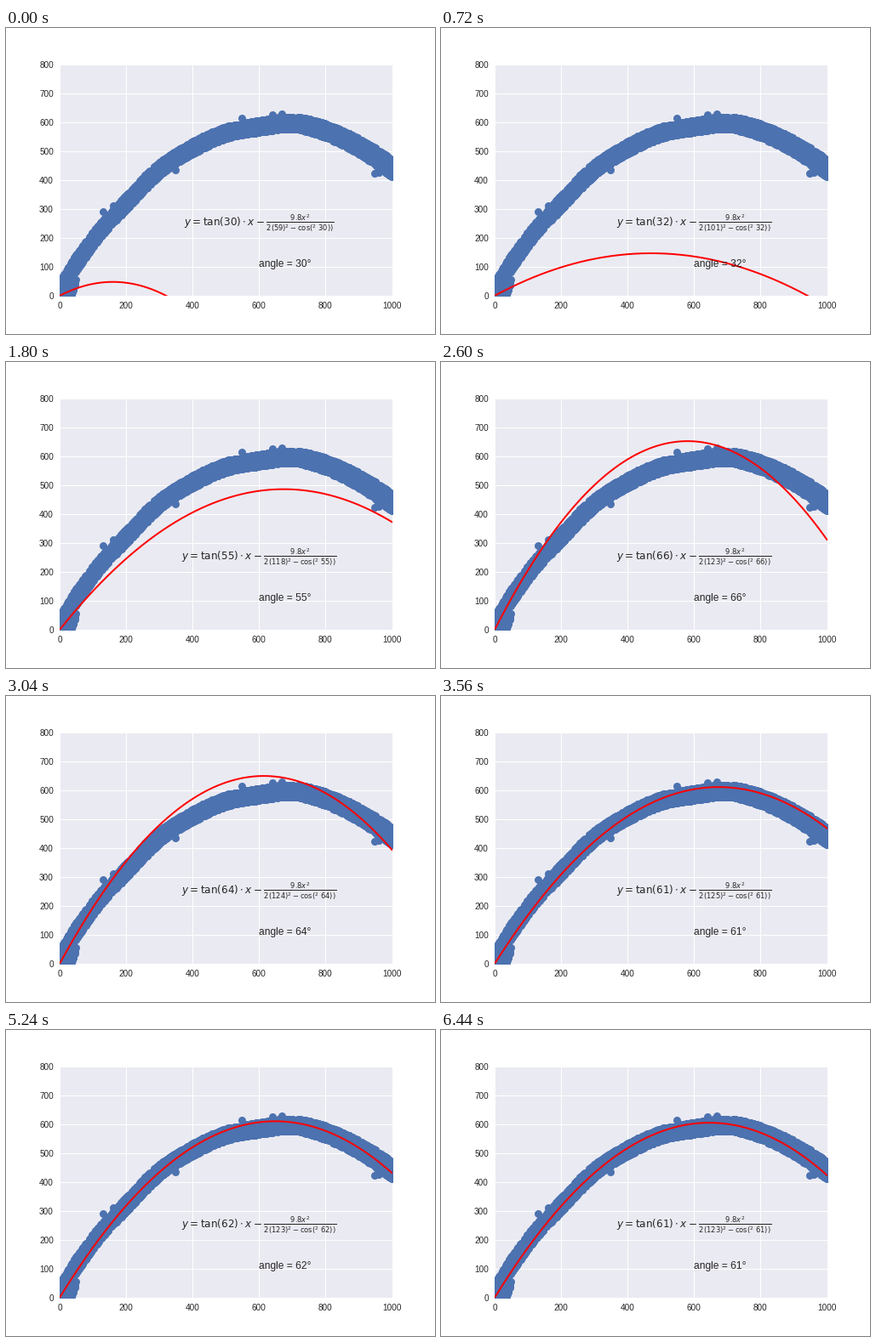
Animation of 504x360 px, one loop 6.52 s. Source, as a matplotlib script:

```python
import numpy as np
import matplotlib.pyplot as plt
from matplotlib.animation import FuncAnimation

INK = "0.15"
FRAMES, INTERVAL = 163, 40
G = 9.8

plt.rcParams.update({
    "font.family": "Liberation Sans",
    "mathtext.fontset": "dejavusans",
    "text.color": INK,
})

# Key points of the fit: step, angle in degrees, speed
FIT = np.array([
    (0, 30.9, 59.7), (13, 31.8, 99.5), (24, 35.9, 110.7),
    (36, 55.3, 118.8), (52, 66.05, 123.8), (71, 61.15, 125.03),
    (82, 60.4, 124.7), (105, 62.05, 123.9), (129, 61.95, 123.5),
])

# Key points on the middle of the scatter band
PATH = np.array([
    (0, 20), (100, 194), (200, 322), (300, 438), (400, 512),
    (500, 564), (600, 586), (700, 598), (850, 547), (1000, 440),
])
STRAYS = [(130, 291), (161, 312), (348, 437), (549, 615),
          (641, 627), (667, 630), (947, 423), (960, 427)]


def smooth(x, y, t):
    """Cubic Hermite interpolation through the points (x, y)."""
    slope = np.gradient(y, x, edge_order=2)
    i = np.clip(np.searchsorted(x, t, side="right") - 1, 0, len(x) - 2)
    h = x[i + 1] - x[i]
    u = (t - x[i]) / h
    return (y[i] * (1 + 2 * u) * (1 - u) ** 2
            + y[i + 1] * u * u * (3 - 2 * u)
            + h * u * (1 - u) * (slope[i] * (1 - u) - slope[i + 1] * u))


def scatter_data():
    rng = np.random.default_rng(7)
    x = np.linspace(0, 1000, 3000)
    mid = smooth(*PATH.T, x)
    # Brush half-width grows to the right; keep it even across the slope
    half = (15 + 0.009 * x) * np.hypot(1, 0.87 * np.gradient(mid, x))
    y = mid + half * np.clip(rng.uniform(-1.2, 1.2, x.size), -1, 1)
    band = np.column_stack([x, y])
    pile_y = rng.uniform(0, 57, 200)
    pile = np.column_stack([rng.uniform(0, 36 + 0.27 * pile_y), pile_y])
    return np.vstack([band, pile, STRAYS])


fig = plt.figure(figsize=(7, 5), dpi=72, facecolor="white")
ax = fig.add_axes([0.125, 0.125, 0.775, 0.755], facecolor="#EAEAF2")
ax.set(xlim=(0, 1000), ylim=(0, 800),
       xticks=range(0, 1001, 200), yticks=range(0, 801, 100))
ax.set_axisbelow(True)
ax.grid(color="white", lw=1)
ax.tick_params(length=0, pad=7, labelsize=10, labelcolor=INK)
for spine in ax.spines.values():
    spine.set_visible(False)

ax.plot(*scatter_data().T, "o", ms=9, mew=0, color="#4C72B0")
xs = np.linspace(0, 1000, 300)
curve, = ax.plot(xs, xs, color="red", lw=2, solid_capstyle="round")
formula = ax.text(600, 250, "", fontsize=12, ha="center", va="center")
label = ax.text(600, 100, "", fontsize=12)


def update(frame):
    step = (4 * frame + 1) // 5  # 20 fps steps on a 25 fps clock
    steps, angles, speeds = FIT.T
    deg, speed = smooth(steps, angles, step), smooth(steps, speeds, step)
    a = np.radians(deg)
    curve.set_ydata(np.tan(a) * xs - G * xs**2 / (2 * (speed * np.cos(a))**2))
    d, v = int(deg), int(speed)
    formula.set_text(rf"$y = \tan({d}) \cdot x - "
                     rf"\frac{{9.8x^2}}{{2({v})^2 - \cos(^2\ {d}))}}$")
    label.set_text(f"angle = {d}°")
    return curve, formula, label


anim = FuncAnimation(fig, update, frames=FRAMES, interval=INTERVAL,
                     repeat=True, repeat_delay=0, blit=False)
plt.show()
```
